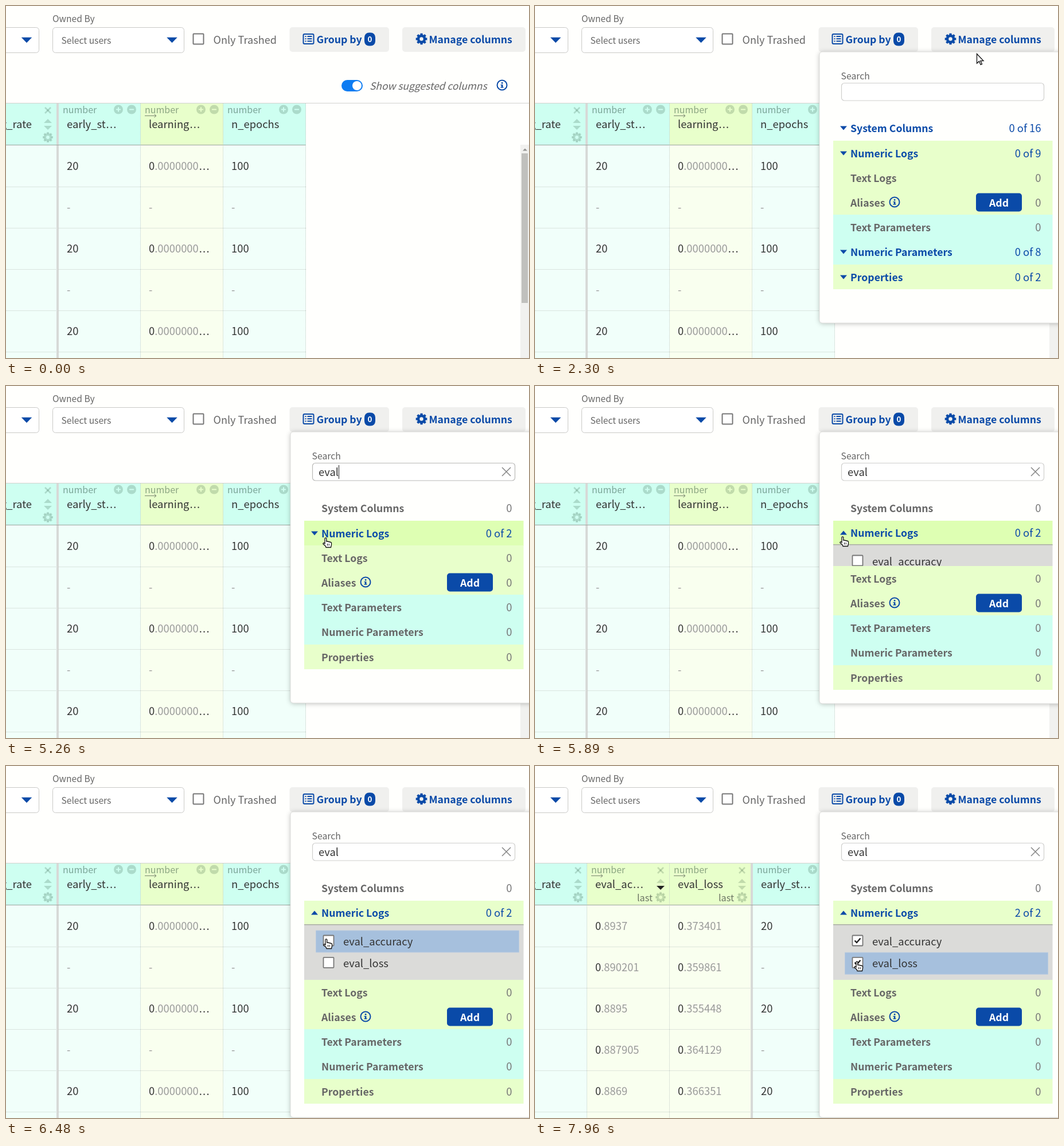
Write an HTML page with a canvas that moves like this. It is 912 px wide and 614 px high and loops after 8000 ms.

```html
<!DOCTYPE html>
<html lang="en">
<head>
<meta charset="utf-8">
<title>Manage columns</title>
<style>
html, body { margin: 0; width: 912px; height: 614px; overflow: hidden; background: #fffffd; }
canvas { display: block; }
</style>
</head>
<body>
<canvas id="stage" width="912" height="614"></canvas>
<script>
const ctx = document.getElementById('stage').getContext('2d');
const LOOP = 8000;
const FAMILY = '"Noto Sans CJK JP", "Noto Sans CJK SC", "Noto Sans CJK", "Open Sans", sans-serif';
const BLUE = '#0a4aa8', INK = '#333', GRAY = '#666', PALE = '#999', PAGE = '#fffffd';
const LIME = { head: '#e8ffcb', cell: '#f9ffef' }, TEAL = { head: '#cefff1', cell: '#f1fffa' };
const OPEN = 1850, UNFOLD = 5850, CHECK = [6930, 7740];

// ---- drawing helpers ----
function text(s, x, y, color = INK, size = 18.4, style = '', align = 'left') {
  ctx.font = `${style} ${size}px ${FAMILY}`;
  ctx.fillStyle = color;
  ctx.textAlign = align;
  ctx.fillText(s, x, y);
  return x + ctx.measureText(s).width;
}
const bold = (s, x, y, color, align) => text(s, x, y, color, 17.65, '600', align);

function ellipsis(x, y) {
  ctx.letterSpacing = '1.2px';
  text('...', x, y);
  ctx.letterSpacing = '0px';
}
function rect(x, y, w, h, color) {
  ctx.fillStyle = color;
  ctx.fillRect(x, y, w, h);
}
function box(x, y, w, h, r, fill, stroke, width = 1) {
  ctx.beginPath();
  ctx.roundRect(x, y, w, h, r);
  if (fill) { ctx.fillStyle = fill; ctx.fill(); }
  if (stroke) { ctx.strokeStyle = stroke; ctx.lineWidth = width; ctx.stroke(); }
}
function line(points, color, width = 1, dash = []) {
  ctx.beginPath();
  for (let i = 0; i < points.length; i += 2) ctx.lineTo(points[i], points[i + 1]);
  ctx.strokeStyle = color;
  ctx.lineWidth = width;
  ctx.setLineDash(dash);
  ctx.stroke();
  ctx.setLineDash([]);
}
// Triangle with its middle at (x, y); a negative h points up.
function triangle(x, y, w, h, color) {
  ctx.beginPath();
  ctx.moveTo(x - w / 2, y - h / 2);
  ctx.lineTo(x + w / 2, y - h / 2);
  ctx.lineTo(x, y + h / 2);
  ctx.fillStyle = color;
  ctx.fill();
}
function circle(x, y, r, fill, stroke, width) {
  box(x - r, y - r, 2 * r, 2 * r, r, fill, stroke, width);
}
function gear(x, y, r, color) {
  circle(x, y, r * 0.56, null, color, r * 0.46);
  for (let i = 0; i < 8; i++) {
    const c = Math.cos(i * Math.PI / 4), s = Math.sin(i * Math.PI / 4);
    line([x + c * r * 0.7, y + s * r * 0.7, x + c * r, y + s * r], color, r * 0.42);
  }
}
function info(x, y) {
  circle(x, y, 8.5, null, BLUE, 2);
  rect(x - 1.2, y - 5, 2.6, 2.6, BLUE);
  rect(x - 1.2, y - 1, 2.6, 5, BLUE);
  rect(x - 2.5, y - 1, 2, 1.3, BLUE);
  rect(x - 2.5, y + 3.2, 5, 1.4, BLUE);
}
function checkbox(x, y, on) {
  box(x, y, 18, 18, 1, '#fff', '#777', 1.8);
  if (on) line([x + 4, y + 9, x + 7.5, y + 12.5, x + 14, y + 5], '#222', 2.4);
}

// ---- pointer ----
const HAND = new Path2D('M-2 10V1.2a1.4 1.4 0 0 1 2.8 0V6h1.5l6 1.5a1.4 1.4 0 0 1 1.2 1.4V12l-1 4.5H0L-1 14-5 10.5a1.2 1.2 0 0 1 1.6-1.6z');
const ARROW = new Path2D('M.5.5V17l4-3.6 2.6 6 2.4-1-2.6-5.8H12z');
const BEAM = new Path2D('M-4-7.5h3l1 1 1-1h3M0-6.5v13M-4 7.5h3l1-1 1 1h3');
const TRACK = [
  [930, 788, 13], [1070, 788, 13], [1220, 794, 55], [2220, 794, 55], [2520, 706, 157],
  [2739, 706, 157], [2740, 673, 162], [2929, 673, 162], [2930, 672, 161], [4300, 672, 161],
  [5070, 562, 251], [5150, 562, 251], [5240, 558, 265], [5340, 558, 265], [5600, 537, 263],
  [5960, 537, 263], [6480, 559, 302], [7000, 559, 302], [7650, 562, 341], [LOOP, 562, 341]
];
function pointerAt(t) {
  const i = TRACK.findIndex(k => k[0] > t);
  if (i < 1) return { x: -99, y: -99 };
  const [t0, x0, y0] = TRACK[i - 1], [t1, x1, y1] = TRACK[i];
  const p = (t - t0) / (t1 - t0);
  return { x: Math.round(x0 + (x1 - x0) * p), y: Math.round(y0 + (y1 - y0) * p) };
}
const onButton = m => m.x > 691 && m.x < 906 && m.y > 37 && m.y < 80;
const between = (v, a, b) => v >= a && v < b;

function drawPointer(t, m) {
  ctx.save();
  ctx.translate(m.x, m.y);
  if (t > OPEN && between(m.y, 134, 166)) {
    ctx.lineWidth = 3.4; ctx.strokeStyle = '#fff'; ctx.stroke(BEAM);
    ctx.lineWidth = 1.6; ctx.strokeStyle = '#111'; ctx.stroke(BEAM);
  } else {
    const shape = onButton(m) || m.y >= 235 ? HAND : ARROW;
    ctx.fillStyle = '#fff'; ctx.fill(shape);
    ctx.lineWidth = 1.3; ctx.strokeStyle = '#111'; ctx.stroke(shape);
    if (shape === HAND) for (const x of [2.5, 5.2]) line([x, 10, x, 13.5], '#111');
  }
  ctx.restore();
}

// ---- toolbar ----
function toolbar(t, m) {
  text('Owned By', 81, 28, GRAY, 15.6);
  box(-9.5, 37.5, 67, 44, 5, '#fff', '#c9c9c6');
  triangle(36, 59.5, 18.5, 9.5, BLUE);
  box(81.5, 37.5, 229, 44, 5, '#fff', '#c9c9c6');
  text('Select users', 96.5, 65.5, GRAY, 15.6);
  triangle(289.5, 59.5, 18.5, 9.5, BLUE);
  box(326.5, 48.5, 18, 18, 1, '#fff', '#777', 2);
  text('Only Trashed', 361.5, 66, GRAY, 18.1);

  box(494.5, 37, 173.5, 43, 5, '#f0f0ee');
  box(518.5, 49, 18, 17, 2, null, BLUE, 2);
  for (let y = 53; y < 64; y += 4.2) {
    rect(521.5, y - 1, 2, 2, BLUE);
    rect(525.5, y - 1, 8, 2, BLUE);
  }
  bold('Group by', 541.5, 65, BLUE);
  box(625, 46.5, 19, 23, 8, BLUE);
  text('0', 634.5, 63, '#fff', 13.4, '600', 'center');

  const hover = onButton(m);
  const color = !hover ? BLUE : between(t, 1630, OPEN) ? '#5a88c4' : '#2f66b5';
  box(691, 37, 215, 43, 5, hover ? '#dcdcd9' : '#f0f0ee');
  gear(724.5, 57.5, 9.8, color);
  bold('Manage columns', 737.5, 65, color);

  if (t < OPEN) {
    box(585, 129, 37, 20, 10, '#0d7cf2');
    circle(612, 139, 8, '#fff');
    text('Show suggested columns', 634, 146, GRAY, 17.4, 'italic');
    info(865, 138);
  }
}

// ---- table ----
const METRICS = [
  { name: 'eval_ac', cut: true, sorted: true, data: ['8937', '890201', '8895', '887905', '8869', '8862'] },
  { name: 'eval_loss', data: ['373401', '359861', '355448', '364129', '366351', '361207'] }
];
const SUGGESTED = [
  { name: 'early_st', cut: true, value: '20', tone: TEAL },
  { name: 'learning', cut: true, value: '0', rest: '.0000000', tone: LIME },
  { name: 'n_epochs', value: '100', tone: TEAL }
];
const SHADE = 'rgba(0,40,20,.17)';

function pinnedIcons(x, sorted) {
  line([x - 5, 177, x + 5, 187], SHADE, 2.6);
  line([x + 5, 177, x - 5, 187], SHADE, 2.6);
  triangle(x, 200.5, 14, -7, SHADE);
  triangle(x, 212.5, 14, 7, sorted ? '#222' : SHADE);
  gear(x, 229, 9, SHADE);
}
function sign(x, plus, tone) {
  circle(x, 180.5, 8, SHADE);
  rect(x - 4, 179.5, 8, 2, tone.head);
  if (plus) rect(x - 1, 176.5, 2, 8, tone.head);
}
function columnBack(x, tone, w = 144) {
  rect(x, 170, w, 72, tone.head);
  rect(x, 242, w, 372, tone.cell);
}
function header(x, col, tone, shift) {
  text('number', x + 7 + shift, 187, 'rgba(0,30,20,.4)', 16);
  if (tone === LIME) {
    line([x + 7, 191.5, x + 27, 191.5], '#78836e');
    line([x + 23.5, 188.5, x + 27, 191.5, x + 23.5, 194.5], '#78836e');
  }
  const end = text(col.name, x + 14 + shift, 213);
  if (col.cut) ellipsis(end + 1, 213);
}
function table(pinned) {
  const split = 91 + 144 * pinned;
  const right = split + 432;
  columnBack(-60, TEAL, 151);
  text('learning_rate', 45, 213, INK, 18.4, '', 'right');
  pinnedIcons(pinned ? 75 : 73);

  for (let c = 0; c < pinned; c++) {
    const x = 91 + 144 * c, col = METRICS[c], icon = x + (c === pinned - 1 ? 126 : 128);
    columnBack(x, LIME);
    header(x, col, LIME, 0);
    pinnedIcons(icon, col.sorted);
    text('last', icon - 14, 236, '#6c7664', 16.2, '', 'right');
    col.data.forEach((d, r) => {
      const y = 286 + 72 * r;
      text('.' + d, text('0', x + 14, y), y, PALE);
    });
  }
  SUGGESTED.forEach((col, c) => {
    const x = split + 144 * c, shift = c ? 0 : 1;
    columnBack(x, col.tone);
    header(x, col, col.tone, shift);
    sign(x + 105, true, col.tone);
    sign(x + 128, false, col.tone);
    for (let r = 0; r < 5; r++) {
      const y = 286 + 72 * r, left = x + 14 + shift;
      if (r % 2) { text('-', left, y, PALE); continue; }
      const end = text(col.value, left, y);
      if (col.rest) ellipsis(text(col.rest, end, y, PALE) + 1, y);
    }
  });
  for (let y = 315.5; y < 614; y += 72) line([0, y, right, y], '#c3cbc6', 1, [1, 1]);
  for (let x = 91; x <= right; x += 144) line([x - 0.5, 170, x - 0.5, 614], '#c3cbc6', 1, [1, 1]);
  rect(split - 3, 170, 4, 444, '#d7d9d7');
  rect(0, 169, 912, 1, '#d2d2d0');
  rect(0, 242, right, 1, '#9da39f');

  rect(897, 242, 15, 372, '#f1f1ef');
  triangle(905, 250.5, 8, -4, '#90908e');
  rect(899, 257, 11, 261, '#c0c0bd');
}

// ---- column picker ----
// Counts for: empty search, "e", "ev", "eval".
const GROUPS = [
  ['System Columns', null, ['0 of 16', '0 of 9', '0', '0']],
  ['Numeric Logs', LIME, ['0 of 9', '0 of 6', '0 of 2', '0 of 2']],
  ['Text Logs', LIME, ['0', '0', '0', '0']],
  ['Aliases', LIME, ['0', '0', '0', '0']],
  ['Text Parameters', TEAL, ['0', '0', '0', '0']],
  ['Numeric Parameters', TEAL, ['0 of 8', '0 of 6', '0 of 1', '0']],
  ['Properties', LIME, ['0 of 2', '0 of 2', '0', '0']]
];
const passed = (times, t) => times.filter(k => t >= k).length;

function searchField(t) {
  const focused = between(t, 2740, UNFOLD);
  text('Search', 533.5, 128, GRAY, 15.8);
  box(534.5, 134.5, 353, 30.5, 5, '#fff', focused ? '#b9b9b7' : '#cfcfcd', 1.2);
  const typed = 'eval'.slice(0, passed([3150, 3330, 3560, 3630], t));
  const end = text(typed, 545, 157);
  if (typed) {
    line([865, 142, 880, 157], '#888', 1.6);
    line([880, 142, 865, 157], '#888', 1.6);
  }
  const blinkOff = t >= 3700 && Math.floor((t - 3700) / 600) % 2;
  if (focused && !blinkOff) rect(Math.round(end), 138, 1, 24, '#222');
}
function foldout(height, checked, m) {
  ctx.save();
  ctx.beginPath();
  ctx.rect(520, 276, 382.5, height + 2);
  ctx.clip();
  rect(520, 276, 383, 98, '#dbdbd9');
  rect(520, 276, 383, 1.5, '#a9ada3');
  ['eval_accuracy', 'eval_loss'].forEach((name, i) => {
    const y = 287 + 38.3 * i;
    if (between(m.y, y, y + 38.3)) box(540.5, y, 354, 38, 0, '#a6c0dd', '#b9cbe0');
    checkbox(553.5, y + 8.5, checked > i);
    text(name, 588, Math.floor(y + 26.5));
  });
  ctx.restore();
}
function picker(t, m, checked) {
  const p = Math.min(1, Math.max(0, (t - UNFOLD) / 193));
  const grow = Math.floor(95 * (1 - (1 - p) ** 2));
  const bottom = Math.max(553, 494 + grow + 24);
  ctx.save();
  ctx.shadowColor = 'rgba(0,0,0,.26)';
  ctx.shadowBlur = 8;
  ctx.shadowOffsetY = 1;
  box(496, 80, 440, bottom - 80, 5, PAGE);
  ctx.restore();
  box(496, 80, 440, bottom - 80, 5, null, '#dededc');
  searchField(t);

  const stage = passed([3240, 3480, 3700], t);
  GROUPS.forEach(([label, tone, counts], i) => {
    const top = Math.floor(191.8 + 43.2 * i) + (i > 1 ? grow : 0), base = top + 29;
    const numeric = i === 1, unfolded = numeric && p > 0;
    const count = numeric && checked ? checked + ' of 2' : counts[stage];
    const active = count !== '0', y = unfolded ? base - 1 : base;
    const hover = numeric && between(m.y, 235, 277);
    if (tone) rect(520, top, 382.5, i < 6 ? 44 : 43, hover ? '#deffb3' : tone.head);
    if (active) triangle(538, y - 7, 12, unfolded ? -7 : 7, BLUE);
    bold(label, 550, y, active ? BLUE : GRAY);
    text(count, 882.5, y, active ? BLUE : '#777', 18.4, '', 'right');
    if (label === 'Aliases') {
      info(627, y - 8);
      box(769, y - 23.5, 80, 32, 5, BLUE);
      bold('Add', 809, y, '#fff', 'center');
    }
  });
  if (p > 0) foldout(grow, checked, m);
}

function draw(t) {
  const m = pointerAt(t), checked = passed(CHECK, t);
  rect(0, 0, 912, 614, PAGE);
  toolbar(t, m);
  table(checked);
  if (t >= OPEN) picker(t, m, checked);
  drawPointer(t, m);
}
function tick() {
  draw(performance.now() % LOOP);
  requestAnimationFrame(tick);
}
tick();
</script>
</body>
</html>
```
